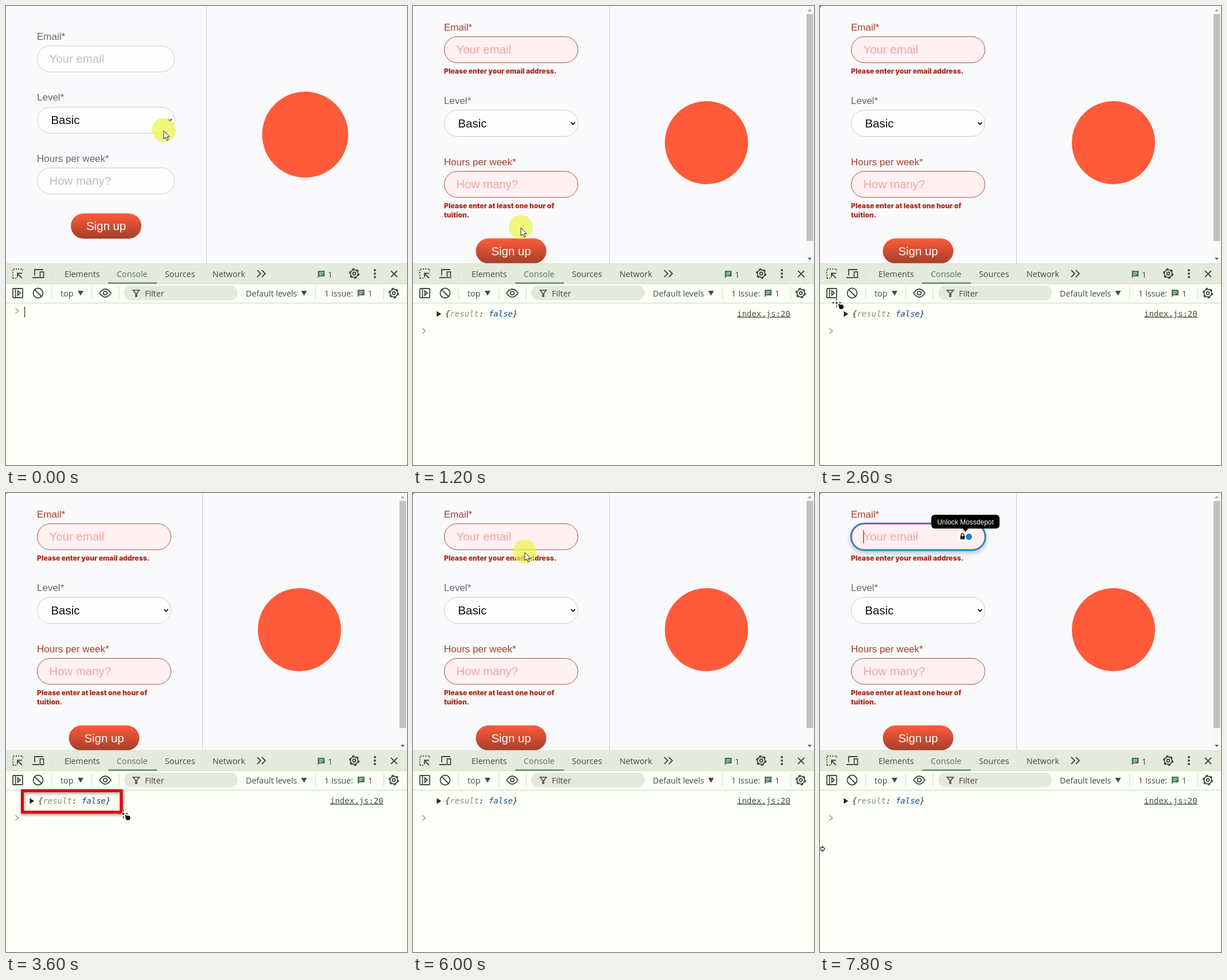
Recreate the animation shown at these times as an HTML page. Size 699x801 px, loop 8 s.

```html
<!DOCTYPE html>
<html lang="en">
<head>
<meta charset="utf-8">
<title>Form validation demo</title>
<style>
  html, body { margin: 0; width: 100%; height: 100%; overflow: hidden; background: #fafafd; }
  svg { display: block; width: 100%; height: 100%; }
  .form { font: 17px "Liberation Sans", Arial, sans-serif; fill: #5f6b69; }
  .big { font-size: 20.4px; }
  .error { font: 900 12px Inter, sans-serif; fill: #a93522; }
  .tools { font: 14.3px "Open Sans", "Noto Sans", sans-serif; fill: #43493f; }
  .mono { font: 14px "DejaVu Sans Mono", monospace; }
  .line { fill: none; stroke: #43493f; stroke-width: 1.8; }
  .tip { font: 12px "Liberation Sans", Arial, sans-serif; fill: #fff; }
</style>
</head>
<body>
<svg viewBox="0 0 699 801" preserveAspectRatio="none">
  <defs>
    <linearGradient id="red" x2="0" y2="1">
      <stop stop-color="#ff5b39"/><stop offset="1" stop-color="#a53f2b"/>
    </linearGradient>
    <filter id="shadow" x="-20%" y="-40%" width="140%" height="190%">
      <feDropShadow dx="1" dy="2" stdDeviation="2.5" flood-opacity=".45"/>
    </filter>
    <filter id="glow" x="-10%" y="-30%" width="120%" height="180%">
      <feDropShadow dx="0" dy="4" stdDeviation="4" flood-color="#5a7890" flood-opacity=".4"/>
    </filter>
    <g id="gear" class="line">
      <circle r="6.600"/>
      <circle r="8.200" stroke-width="2" stroke-dasharray="4.300 4.287"/>
      <circle r="2.500"/>
    </g>
    <g id="note">
      <path d="M-6-6H6V4H-3L-6 7Z" fill="#4d7656"/>
      <path d="M-3.5-3H3.5M-3.5-.8H3.5M-3.5 1.4H1" stroke="#e6ecdc"/>
    </g>
    <path id="down" d="M-5-4H5L0 4.5Z"/>
    <path id="prompt" d="M-3-4.5L2 0L-3 4.5" fill="none" stroke="#969b93" stroke-width="1.6"/>
  </defs>

  <rect width="699" height="801" fill="#fafafd"/>
  <g id="before"></g>
  <g id="after"></g>

  <g id="focus">
    <rect x="54" y="53" width="234.5" height="47" rx="23.5" fill="#fff0f1" stroke="#2389c4" stroke-width="2.6" filter="url(#glow)"/>
    <rect x="55.5" y="54.5" width="231.5" height="44" rx="22" fill="none" stroke="#a4564b" stroke-width=".8"/>
    <text class="form big" x="75.5" y="83" style="fill:#f5a3a1">Your email</text>
    <path id="caret" d="M76 65V88" stroke="#333" stroke-width="1.2"/>
  </g>
  <g id="badge">
    <rect x="-13" y="-7" width="26" height="14" rx="4" fill="#fff"/>
    <rect x="-9.5" y="-1.5" width="8" height="6" rx="1" fill="#222"/>
    <path d="M-8-1V-3a2.5 2.5 0 0 1 5 0V-1" fill="none" stroke="#222" stroke-width="1.4"/>
    <circle cx="5.5" r="5.5" fill="#1683d8"/>
  </g>
  <g id="tooltip">
    <path d="M248 61H259L253.500 68Z"/>
    <rect x="194" y="38" width="119" height="24" rx="6"/>
    <text class="tip" x="253.500" y="54.500" text-anchor="middle">Unlock Mossdepot</text>
  </g>
  <circle id="corner" r="1.6"/>

  <g class="tools">
    <rect y="449" width="699" height="352" fill="#fbfff5"/>
    <rect y="449" width="699" height="35.500" fill="#e4ebdc"/>
    <path d="M0 449.500H699M0 484.500H699M0 518.500H699M79.500 458V476M79.500 490V512M149.500 490V512M197 490V512M539.500 490V512M658.500 490V512" stroke="#cdebc8" stroke-width="1.300"/>
    <rect x="178" y="482.500" width="85" height="2" fill="#50725a"/>
    <rect x="206" y="488" width="198" height="25.500" rx="12.750" fill="#e4e9db"/>

    <text x="102" y="472.500">Elements</text>
    <text x="193" y="472.500" fill="#52765d">Console</text>
    <text x="277" y="472.500">Sources</text>
    <text x="360" y="472.500">Network</text>
    <text x="561" y="473.500">1</text>
    <text x="95" y="506.500">top</text>
    <text x="242" y="506.500">Filter</text>
    <text x="418" y="506.500">Default levels</text>
    <text x="555" y="506.500">1 Issue:</text>
    <text x="631" y="506.500">1</text>

    <g class="line">
      <path d="M12 475V459H29V464M12 475H18" stroke-dasharray="2 2.200"/>
      <path d="M28 475L20 467M20 473.500V466.500H28"/>
      <path d="M50 470V460H65M46 474H58"/>
      <rect x="59.500" y="464" width="6" height="10"/>
      <path d="M438 461L444 467L438 473M446 461L452 467L446 473M671 462L682 473M682 462L671 473"/>
      <rect x="12" y="493" width="17" height="16" rx="1"/>
      <path d="M16.500 493V509M20.500 497L25 501L20.500 505Z"/>
      <circle cx="56" cy="501" r="8.500"/>
      <path d="M50 495L62 507"/>
      <path d="M163 501Q173 487 183 501Q173 515 163 501Z"/>
      <circle cx="173" cy="501" r="3.200"/>
      <path d="M221.500 496H232.500L228 501.500V507H226V501.500Z" stroke-width="1.600"/>
    </g>
    <path d="M643 461h.01M643 467h.01M643 473h.01" stroke="#43493f" stroke-width="4" stroke-linecap="round"/>
    <use href="#gear" x="607" y="467"/>
    <use href="#gear" x="676" y="501"/>
    <use href="#note" x="549.500" y="468"/>
    <use href="#note" x="619" y="501"/>
    <use href="#down" x="130" y="501"/>
    <use href="#down" x="519.500" y="501"/>
  </g>

  <g id="idleConsole">
    <use href="#prompt" x="19.500" y="532"/>
    <path id="consoleCaret" d="M32.500 525V543" stroke="#222" stroke-width="1.200"/>
  </g>
  <g id="log" class="mono">
    <path d="M41.500 532.500L49 537.500L41.500 542.500Z" fill="#222"/>
    <text x="56" y="542" font-style="italic" fill="#333">{<tspan fill="#8a8f88">result</tspan>: <tspan fill="#1b4891">false</tspan>}</text>
    <text x="565" y="541.500" fill="#4a534a" text-decoration="underline">index.js:20</text>
    <use href="#prompt" x="19.500" y="567"/>
  </g>

  <rect id="frame" x="28.500" y="519.500" fill="none" stroke="#df0308" stroke-width="5" filter="url(#shadow)"/>

  <g id="cursor">
    <circle id="halo" cy="-1.500" r="21" fill="#ecf649" opacity=".7"/>
    <path id="arrow" d="M0 0V14L3.300 11L5.500 16.300L8 15.200L5.800 10.200H10Z" fill="#fff" stroke="#222"/>
    <path id="beam" d="M-3-6.500Q0-6.500 0-4.500Q0-6.500 3-6.500M0-4.500V4.500M-3 6.500Q0 6.500 0 4.500Q0 6.500 3 6.500" fill="none" stroke="#222" stroke-width="1.300"/>
    <g id="pen">
      <path d="M-8 0H8M0-8V8" stroke="#fff" stroke-width="3" opacity=".7"/>
      <path d="M-8 0H8M0-8V8" stroke="#222" stroke-width="1.300" stroke-dasharray="4 2"/>
      <path d="M3 3L7 5" stroke="#000" stroke-width="2.500"/>
      <circle cx="8" cy="7" r="4"/>
    </g>
    <path id="edge" d="M0-1.800H4V-4.500L8.500 0L4 4.500V1.800H0Z" fill="#fff" stroke="#222" stroke-width="1.200"/>
  </g>
</svg>

<script>
const $ = id => document.getElementById(id);
const show = (id, on) => $(id).setAttribute('display', on ? 'inline' : 'none');
const move = (id, x, y, scale = 1) => $(id).setAttribute('transform', `translate(${x} ${y}) scale(${scale})`);

const label = (text, y, bad) => `<text x="54" y="${y}"${bad ? ' style="fill:#a33d2c"' : ''}>${text}</text>`;

function field(text, y, right, bad, color) {
  const [fill, stroke] = bad ? ['#fff0f1', '#a34d3e'] : ['#fefefe', '#cbcccb'];
  return `<rect x="54.5" y="${y}" width="${right - 54.5}" height="45.5" rx="22.75" fill="${fill}" stroke="${stroke}"/>
    <text class="big" x="${text === 'Basic' ? 78.5 : 75.5}" y="${y + 29.8}" style="fill:${color}">${text}</text>`;
}

const error = (text, y) => `<text class="error" x="54" y="${y}">${text}</text>`;

function form({ bad, right, divider, tops, button, logo }) {
  const hint = bad ? '#f5a3a1' : '#bcc1c3';
  const [email, level, hours] = tops;
  const [bx, by] = button;
  return `<g class="form">
    <path d="M${divider} 0V449" stroke="#c9c9cc"/>
    ${label('Email*', email - 11, bad)}${field('Your email', email, right, bad, hint)}
    ${label('Level*', level - 11.2)}${field('Basic', level, right, false, '#111')}
    <path d="M${right - 12} ${level + 21}l3.500 3.500l3.500-3.500" fill="none" stroke="#222" stroke-width="2"/>
    ${label('Hours per week*', hours - 11, bad)}${field('How many?', hours, right, bad, hint)}
    <rect x="${bx}" y="${by}" width="123" height="44" rx="22" fill="url(#red)"/>
    <text class="big" x="${bx + 61.5}" y="${by + 29}" text-anchor="middle" style="fill:#fff">Sign up</text>
    <circle cx="${logo[0]}" cy="${logo[1]}" r="${logo[2]}" fill="#ff5b3a"/>
  </g>`;
}

$('before').innerHTML = form({
  bad: false, right: 294, divider: 349.5, tops: [69.5, 176.5, 282.5], button: [113, 362], logo: [521.5, 224.5, 75]
});
$('after').innerHTML = form({
  bad: true, right: 287.5, divider: 342.5, tops: [53.5, 182, 288.5], button: [109.5, 405.5], logo: [511.5, 238.5, 72.5]
}) + error('Please enter your email address.', 118)
   + error('Please enter at least one hour of', 353) + error('tuition.', 368.5)
   + `<rect x="685" width="14" height="449" fill="#f8f8f9"/>
      <rect x="686" y="14" width="11.500" height="396" fill="#c1c1c2"/>
      <path d="M688 9L691.500 5.500L695 9Z" fill="#999"/>
      <path d="M688 439.500H695L691.500 443Z" fill="#444"/>`;

// Pointer stops: time, x, y
const stops = [
  [0, 275, 218], [800, 188, 384], [1200, 188, 387], [2400, 31, 512], [2600, 29, 518],
  [3600, 204.5, 560], [4200, 333, 460], [4700, 225, 398], [5000, 187, 420], [5200, 190, 415],
  [5600, 260, 265], [6000, 195, 104], [6400, 125, 73], [6600, 125, 73], [7000, 32, 539]
];

const slope = (i, axis) => i < 1 || i >= stops.length ? 0 :
  (stops[i][axis] - stops[i - 1][axis]) / (stops[i][0] - stops[i - 1][0]);

// Harmonic mean of the neighbouring slopes: flows through stops, never overshoots
function velocity(i, axis) {
  const a = slope(i, axis), b = slope(i + 1, axis);
  return a * b > 0 ? 2 * a * b / (a + b) : 0;
}

function pointer(t) {
  const next = stops.findIndex(stop => stop[0] > t);
  if (next < 0) return t < 7200 ? stops.at(-1).slice(1) : [0, 621];
  const from = stops[next - 1], to = stops[next];
  const span = to[0] - from[0], p = (t - from[0]) / span, q = 1 - p;
  return [1, 2].map(axis =>
    from[axis] * q * q * (1 + 2 * p) + to[axis] * p * p * (1 + 2 * q) +
    span * p * q * (velocity(next - 1, axis) * q - velocity(next, axis) * p));
}

function draw(t) {
  const within = (from, to) => t >= from && t < to;
  const failed = t >= 1000;
  const drawing = within(1600, 5200);
  const inField = within(6200, 6800);
  const away = t >= 7200;
  const [x, y] = pointer(t);

  show('before', !failed);
  show('after', failed);
  show('idleConsole', !failed);
  show('consoleCaret', t < 400);
  show('log', failed);
  show('corner', t >= 1600);

  show('focus', t >= 6400);
  show('caret', within(6400, 7000) || t >= 7400);
  show('badge', t >= 6600);
  show('tooltip', t >= 6600);
  move('badge', 254, 76.3, t < 6800 ? .85 : 1);
  $('badge').setAttribute('opacity', t < 6800 ? .75 : 1);
  move('tooltip', 0, t < 6800 ? 1 : 0);

  const [cornerX, cornerY] = t < 3600 ? [x - 3.5, y - 3] : [201, 557];
  show('frame', within(2800, 5200));
  $('frame').setAttribute('width', Math.max(0, cornerX - 28.5));
  $('frame').setAttribute('height', Math.max(0, cornerY - 519.5));

  move('cursor', x, y);
  show('halo', !drawing && !away);
  show('arrow', !drawing && !inField && !away);
  show('beam', inField);
  show('pen', drawing);
  show('edge', t >= 7800);
}

const STEP = 200, LOOP = 8000;
const start = performance.now();
function tick() {
  const t = (performance.now() - start) % LOOP;
  draw(Math.floor(t / STEP) * STEP);
  requestAnimationFrame(tick);
}
tick();
</script>
</body>
</html>
```
